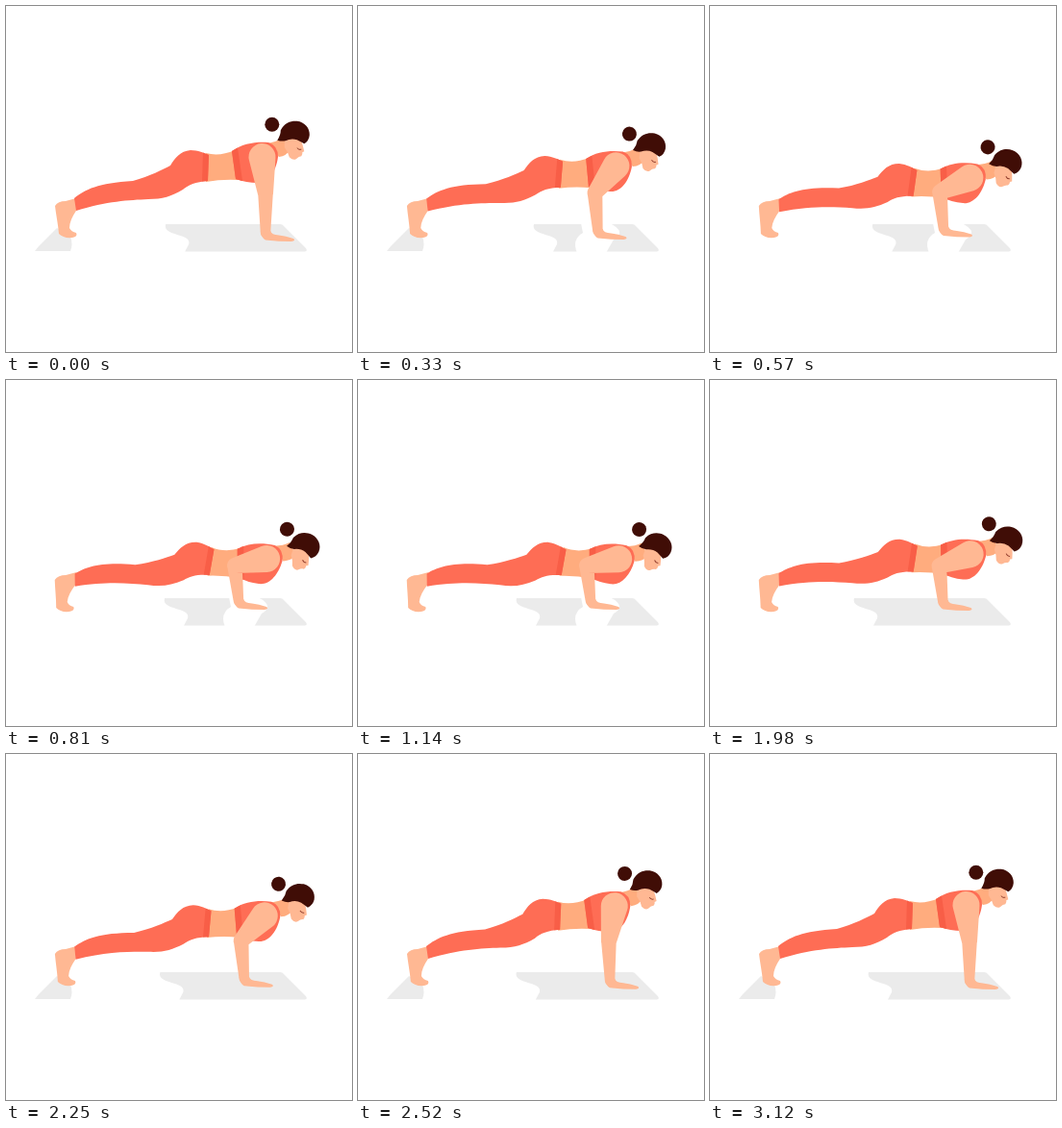
These frames come from a looping animation (360 px wide and 360 px high, 3.15 s). An HTML page:

```html
<!DOCTYPE html>
<html lang="en">
<head>
<meta charset="utf-8">
<title>Push-up</title>
<style>
  html, body { margin: 0; width: 100%; height: 100%; overflow: hidden; background: #fff; }
  svg { display: block; width: 100vw; height: 100vh; }
  .skin { fill: #ffb893; }
  .shade { fill: #ffac7e; }
  .cloth { fill: #fe6d55; }
  .band { fill: #f85e47; }
  .hair { fill: #400d06; }
  .mat { fill: #ebebeb; }
</style>
</head>
<body>
<svg viewBox="0 0 360 360">
  <path id="mat" class="mat"/>
  <path id="gap" fill="#fff" d="M232 226 H262 Q280 235 266 243 L258 257 H228 Q222 243 234 236Z"/>
  <path id="footMat" class="mat" d="M53 231 L34 250 L30 255 H67 Q70 248 67 240Z"/>

  <path id="foot" class="skin" d="M51 208 Q54 203 62 203 L73 200 L73 213 C69 219 66 225 66 231 Q68 235 73 236 Q75 240 69 241 Q60 242 55 237 C54 226 52 217 51 208Z"/>

  <g id="body">
    <path class="shade" d="M208 153 Q222 157 238 150 L242 181 Q225 180 208 183Z"/>
    <path class="cloth" d="M71 200 C82 191 96 184 132 182 C150 177 163 170 171 166 C176 158 181 151 192 150 C200 150 206 153 211 155 L210 182 C197 183 190 186 184 191 C172 198 163 201 148 201 C128 202 105 203 73 213Z"/>
    <path class="band" d="M205 152.500 L211 155 L210 182 L204 182.500Z"/>
    <path class="shade" d="M270 143 Q281 142 288 137 L296 149 Q292 156 284 157 Q279 152 270 143Z"/>
    <path class="cloth" d="M235 151 C246 143 260 141 273 142 Q283 145 283 157 C281 172 273 184 262 184 Q250 184 239 180Z"/>
    <path class="band" d="M235 151 L241 147.500 L246 182 L239 180Z"/>
    <g id="head">
      <g transform="translate(276.8 123.2)">
        <path class="skin" d="M13 15 L13 24 Q17 29 18 34 Q22 38 25 36 Q28 33 30.500 33 Q32 31 31.500 29 L33.500 28 L32 22 L29 13Z"/>
        <path fill="none" stroke="#93402f" d="M26 24.500 Q28 27 30.500 26"/>
        <path class="hair" d="M5.500 16.500 Q9 11 9 6 C13 -2 20 -4 26 -3.500 C34 -2.500 39.500 4 39 11 Q38.500 17 33.500 20 Q30 18 26 16 Q20 14 14 17 Q10 18 5.500 16.500Z"/>
        <circle class="hair" r="7.500"/>
      </g>
    </g>
  </g>

  <g class="skin">
    <path id="arm"/>
    <path id="hand" d="M-5.200 -2 Q-4 6 0 7.500 Q14 9 27 9 Q32 8 29 6 Q21 3 14 2.500 Q6 2 5.200 -2Z"/>
  </g>
</svg>
<script>
const LOOP = 3150, STEP = 30;
const ANKLE = { x: 60, y: 205 };
const SHOULDER = { x: 266.5, y: 157 };
const TILT = 8, NOD = 12;

const el = id => document.getElementById(id);
const move = (id, value) => el(id).setAttribute("transform", value);
const ease = u => (1 - Math.cos(Math.PI * Math.min(1, Math.max(0, u)))) / 2;
const bump = (t, centre, width) => Math.exp(-(((t - centre) / width) ** 2));

function rotate(p, pivot, degrees) {
  const a = degrees * Math.PI / 180, dx = p.x - pivot.x, dy = p.y - pivot.y;
  return {
    x: pivot.x + dx * Math.cos(a) - dy * Math.sin(a),
    y: pivot.y + dx * Math.sin(a) + dy * Math.cos(a)
  };
}

// Tapered limb between two round joints.
function limb(p, r1, q, r2) {
  const dir = Math.atan2(q.y - p.y, q.x - p.x);
  const open = Math.acos((r1 - r2) / Math.hypot(q.x - p.x, q.y - p.y));
  const rim = (c, r, a) => `${c.x + r * Math.cos(a)} ${c.y + r * Math.sin(a)}`;
  const a = dir + open, b = dir - open;
  return `M${rim(p, r1, a)}A${r1} ${r1} 0 1 1 ${rim(p, r1, b)}` +
         `L${rim(q, r2, b)}A${r2} ${r2} 0 0 1 ${rim(q, r2, a)}Z`;
}

function drawArm(low) {
  // The hand slides back quickly at first, along a quarter circle.
  const slide = Math.sqrt(1 - (1 - low) ** 2);
  const shoulder = rotate(SHOULDER, ANKLE, TILT * low);
  const elbow = { x: 270 - 32 * slide, y: 195 - 2 * low };
  const wrist = { x: 270 - 28 * slide, y: 236 - 6 * low };
  el("arm").setAttribute("d", limb(shoulder, 14, elbow, 8) + limb(elbow, 7.8, wrist, 5.2));
  move("hand", `translate(${wrist.x} ${wrist.y})`);
}

function drawMat(t, low) {
  const x = 165 + 18 * bump(t, 330, 200) - 15 * bump(t, 1980, 250);
  el("mat").setAttribute("d",
    `M${x} 227 C${x - 4} 240 ${x + 28} 236 ${x + 24} 248 L${x + 20} 255.500 ` +
    "H311 Q314 255 312 252 L289 229 Q288 227 285 227Z");
  const open = ease(t / 330) - ease((t - 1500) / 300);
  move("gap", `translate(${245 * (1 - open)}) scale(${open} 1)`);
  el("footMat").style.display = low < 0.5 ? "" : "none";
}

function draw(t) {
  const low = ease(t / 860) - ease((t - 1737) / 900);
  move("body", `rotate(${TILT * low} ${ANKLE.x} ${ANKLE.y})`);
  move("head", `rotate(${NOD * low} 278 155)`);
  move("foot", `translate(0 ${ANKLE.y}) skewX(${-5 * low}) translate(0 ${-ANKLE.y})`);
  drawArm(low);
  drawMat(t, low);
}

function tick(now) {
  draw(Math.floor(now % LOOP / STEP) * STEP);
  requestAnimationFrame(tick);
}
draw(0);
requestAnimationFrame(tick);
</script>
</body>
</html>
```
